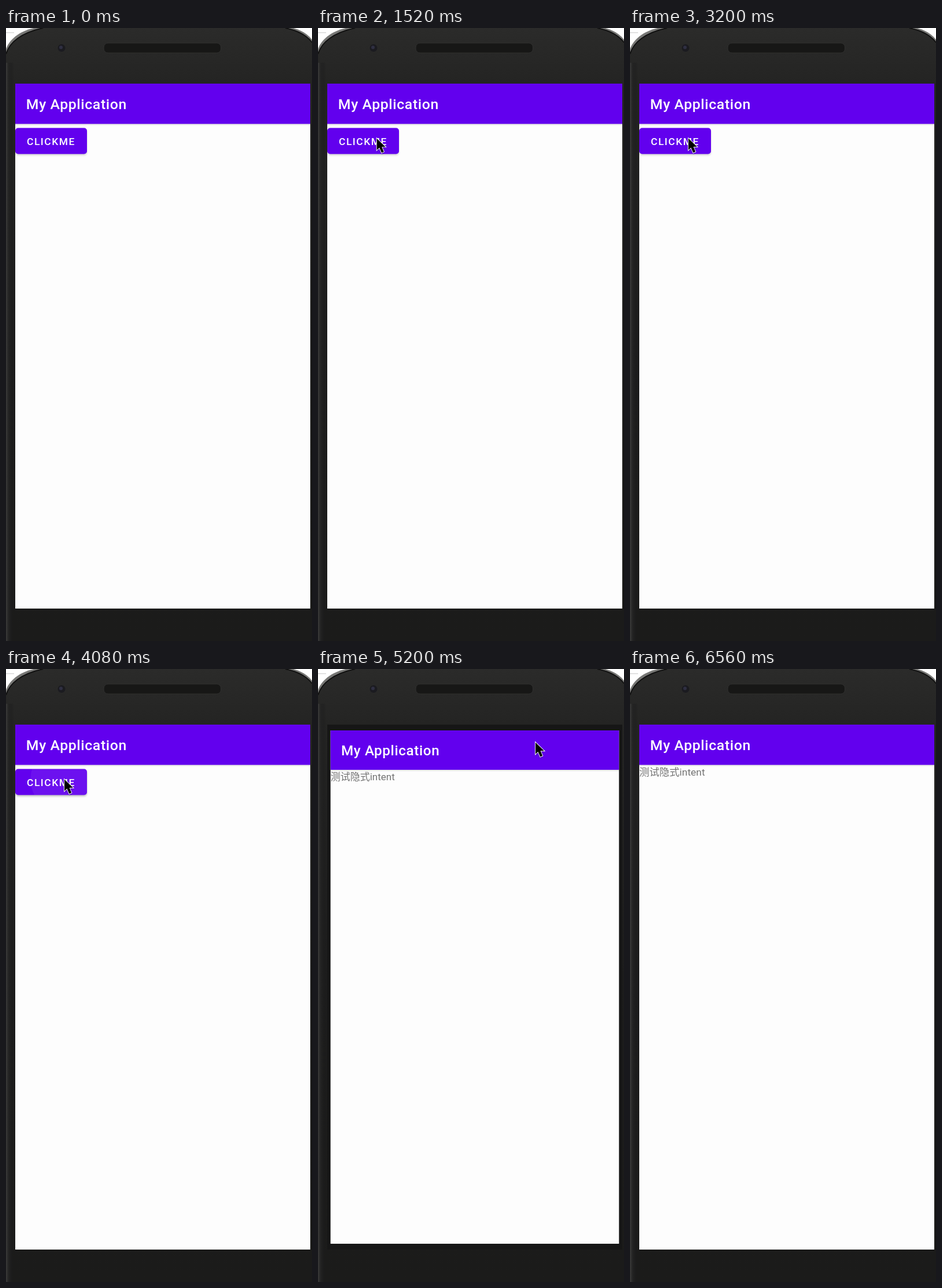
Recreate the animation shown at these times as an HTML page. Size 529 by 1058 pixels, loop 6660 ms.

```html
<!DOCTYPE html>
<html lang="en">
<head>
<meta charset="utf-8">
<title>App launch</title>
<style>
html, body { margin: 0; width: 100%; height: 100%; overflow: hidden; background: #fff; }
svg { display: block; width: 100%; height: 100%; }
text { font-family: Roboto, "Noto Sans CJK SC", "Noto Sans CJK", sans-serif; }
.title { font-size: 24.8px; font-weight: 500; letter-spacing: .62px; fill: #fff; }
.label { font-size: 17.4px; font-weight: 500; letter-spacing: 1.55px; fill: #fff; }
.note { font-size: 17.4px; fill: #747474; }
</style>
</head>
<body>
<svg viewBox="0 0 529 1058">
  <defs>
    <linearGradient id="body" x2="0" y2="1">
      <stop offset="0" stop-color="#2b2b2a"/>
      <stop offset=".09" stop-color="#242423"/>
      <stop offset=".5" stop-color="#1c1c1c"/>
      <stop offset="1" stop-color="#1b1b1a"/>
    </linearGradient>
    <linearGradient id="edge">
      <stop offset="0" stop-color="#3a3a39"/>
      <stop offset=".3" stop-color="#242424"/>
      <stop offset="1" stop-color="#191919" stop-opacity="0"/>
    </linearGradient>
    <linearGradient id="barShade" x2="0" y2="1">
      <stop offset="0" stop-color="#000" stop-opacity=".13"/>
      <stop offset="1" stop-color="#000" stop-opacity="0"/>
    </linearGradient>
    <filter id="soft" x="-30%" y="-30%" width="160%" height="180%">
      <feGaussianBlur stdDeviation="1.6"/>
    </filter>
    <clipPath id="screen"><rect x="16" y="96" width="510" height="906"/></clipPath>
    <clipPath id="button"><rect x="16" y="172.5" width="124" height="45" rx="5"/></clipPath>
    <g id="page">
      <rect x="16" y="96" width="510" height="906" fill="#fdfdfd"/>
      <rect x="16" y="165" width="510" height="4" fill="url(#barShade)"/>
      <rect x="16" y="96" width="510" height="69.5" fill="#6200ee"/>
      <text class="title" x="34.8" y="140.3">My Application</text>
    </g>
    <path id="arrow" d="M1 2.5V22.6L5.5 18.4L9.3 27.2L13.2 25.5L9.6 17H16Z"/>
  </defs>

  <path d="M0 1058V36C6 20 22 6 48 0H497C511 4 522 11 529 20V1058Z" fill="#777775"/>
  <path d="M0 1058V45C6 25 26 8 64 0H483C503 4 519 12 529 25V1058Z" fill="url(#body)"/>
  <path d="M0 45C6 25 26 8 64 0M483 0C503 4 519 12 529 25" fill="none" stroke="#111" stroke-width="2"/>
  <path d="M0 8H14" stroke="#c4c4c4"/>
  <rect y="60" width="14" height="998" fill="url(#edge)"/>
  <circle cx="96" cy="34.5" r="6.5" fill="#1b1b20"/>
  <circle cx="95" cy="33.5" r="3" fill="#2f2f42"/>
  <rect x="169" y="26" width="202.5" height="17" rx="7" fill="#171716" stroke="#30302f"/>

  <g clip-path="url(#screen)">
    <rect x="16" y="96" width="510" height="906" fill="#161616"/>
    <g id="first">
      <use href="#page"/>
      <rect id="lift" x="16" y="175" width="124" height="45" rx="5" filter="url(#soft)"/>
      <rect x="16" y="172.5" width="124" height="45" rx="5" fill="#6200ee"/>
      <g clip-path="url(#button)"><circle id="ripple" cx="101" cy="190" fill="#fff"/></g>
      <text class="label" x="36" y="201.7">CLICKME</text>
    </g>
    <g id="second">
      <use href="#page"/>
      <text class="note" x="16" y="184">测试隐式intent</text>
    </g>
  </g>

  <g id="cursor">
    <use href="#arrow" y="2" fill="#000" opacity=".35" filter="url(#soft)"/>
    <use href="#arrow" fill="#000" stroke="#fff" stroke-width="1.8" paint-order="stroke"/>
  </g>
</svg>
<script>
const LOOP = 6660, OPEN = 104.2, OPEN_LEN = 25, PRESS = 85;
const $ = id => document.getElementById(id);
const [first, second, lift, ripple, cursor] =
  ["first", "second", "lift", "ripple", "cursor"].map($);

const clamp = v => Math.max(0, Math.min(1, v));
const ramp = (v, a, b) => clamp((v - a) / (b - a));
const mix = (a, b, k) => a + (b - a) * k;

function tickAt(ms) {
  if (ms < 20) return 0;
  const s = ms - 20, r = s % 140;
  return Math.floor(s / 140) * 3 + 1 + (r < 100 ? 0 : r < 120 ? 1 : 2);
}

const cubic = (a, b, c, d, u) => {
  const v = 1 - u;
  return a * v * v * v + 3 * b * v * v * u + 3 * c * v * u * u + d * u * u * u;
};

function solve(x, xs, ys) {
  let lo = 0, hi = 1;
  for (let i = 0; i < 24; i++) {
    const mid = (lo + hi) / 2;
    if (cubic(...xs, mid) < x) lo = mid; else hi = mid;
  }
  return cubic(...ys, lo);
}

// Two-part curve: quick start, very long settle.
function settle(x) {
  if (x <= 0) return 0;
  if (x >= 1) return 1;
  return x < 1 / 6
    ? solve(x, [0, .05, .133333, 1 / 6], [0, 0, .06, .4])
    : solve(x, [1 / 6, .208333, .25, 1], [.4, .82, 1, 1]);
}

function zoom(el, scale, alpha) {
  el.setAttribute("transform", `translate(271 549) scale(${scale}) translate(-271 -549)`);
  el.setAttribute("opacity", alpha);
  el.style.display = alpha > 0 ? "" : "none";
}

function cursorAt(n) {
  if (n < 19) {
    const k = 1 - (1 - ramp(n, 4, 19)) ** 2;
    return [mix(540, 137, k), mix(300, 196, k)];
  }
  if (n < 97) {
    const k = 1 - (1 - ramp(n, 19, 34)) ** 2;
    return [mix(137, 100, k), mix(196, 188, k)];
  }
  const k = ((n - 97) / 10) ** 1.7;
  return [100 + 138 * k, 188 - 32 * k];
}

function draw(ms) {
  const n = tickAt(ms);

  const p = settle((n - OPEN) / OPEN_LEN);
  const shown = ramp(n, OPEN + 2.8, OPEN + 5.8);
  zoom(first, mix(1, 1.05, p), shown < 1 ? 1 : 0);
  zoom(second, mix(.85, 1, p), shown);

  const grow = 1 - (1 - ramp(n, PRESS, PRESS + 14)) ** 2;
  ripple.setAttribute("r", mix(30, 105, grow));
  ripple.setAttribute("opacity", .2 * ramp(n, PRESS, PRESS + 9) * (1 - ramp(n, PRESS + 11, PRESS + 20)));
  lift.setAttribute("opacity", .14 + .16 * ramp(n, PRESS, PRESS + 6) * (1 - ramp(n, PRESS + 10, PRESS + 18)));

  const [x, y] = cursorAt(n);
  cursor.setAttribute("transform", `translate(${x} ${y})`);
  cursor.style.display = x < 530 ? "" : "none";
}

function loop() {
  draw(performance.now() % LOOP);
  requestAnimationFrame(loop);
}
loop();
</script>
</body>
</html>
```
